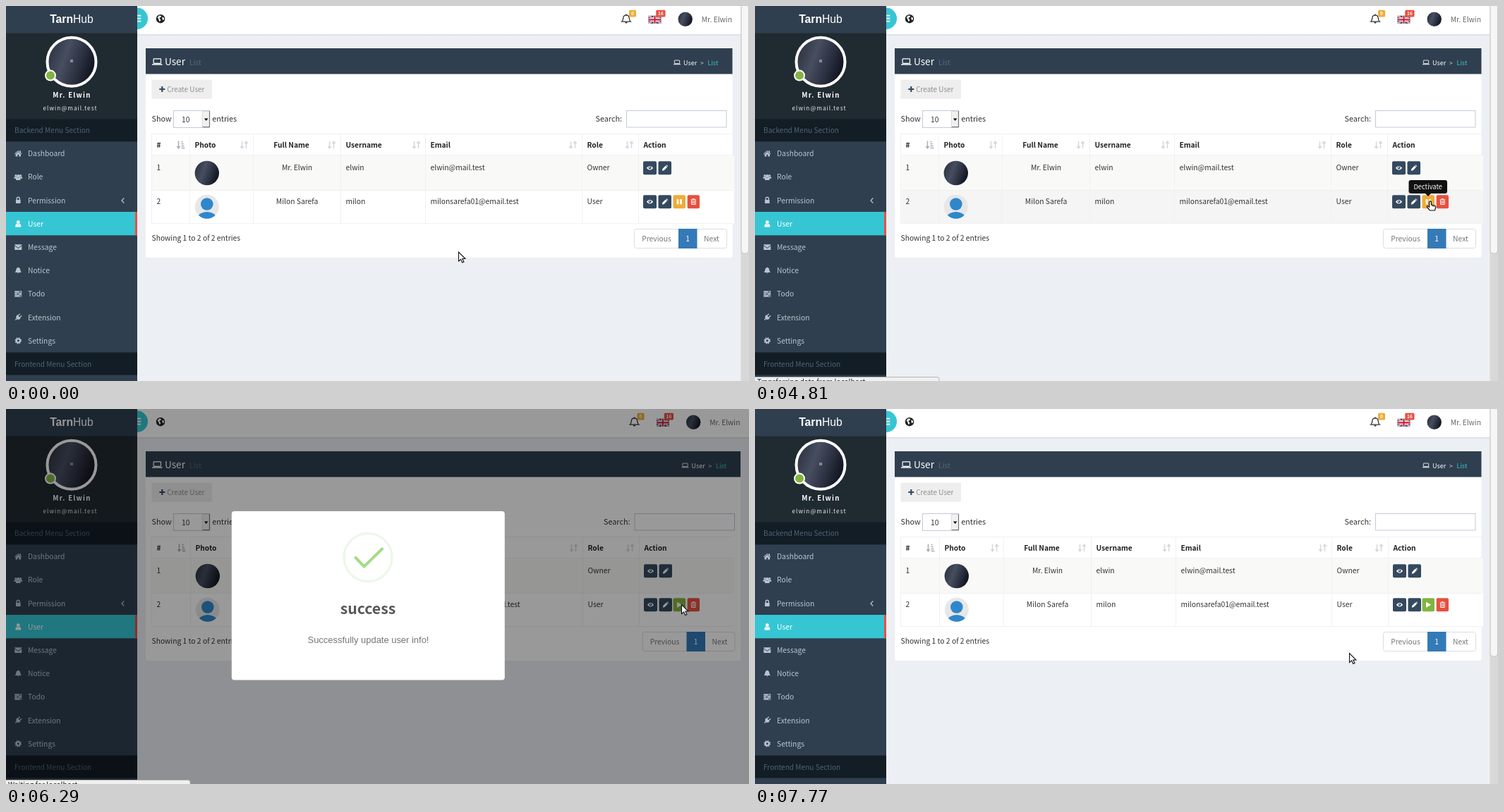
Animation of 1053 by 532 pixels, one loop 8 s. Source, as an HTML page:

```html
<!DOCTYPE html>
<html lang="en">
<head>
<meta charset="utf-8">
<title>User list</title>
<style>
html, body { margin: 0; width: 100%; height: 100%; overflow: hidden; background: #fff; }
svg { display: block; width: 1053px; height: 532px; }
text { font-family: "Noto Sans CJK JP", "Noto Sans CJK SC", "Noto Sans CJK", "Noto Sans", sans-serif; white-space: pre; }
.arial { font-family: "Liberation Sans", Arial, sans-serif; }
</style>
</head>
<body>
<svg viewBox="0 0 1053 532">
  <defs>
    <linearGradient id="photo" x2="1" y2=".35">
      <stop offset="0" stop-color="#252b37"/><stop offset=".45" stop-color="#474e60"/>
      <stop offset=".75" stop-color="#2d3242"/><stop offset="1" stop-color="#151824"/>
    </linearGradient>
    <linearGradient id="shade" x2="0" y2="1">
      <stop offset="0" stop-color="#d9dde2"/><stop offset="1" stop-color="#eceff4"/>
    </linearGradient>
    <clipPath id="round"><circle r="17"/></clipPath>
  </defs>
  <g id="stage"></g>
</svg>
<script>
const NAVY = '#2f3f4f', CYAN = '#36c6d3', RED = '#e7503f', ORANGE = '#f0ac38', GREEN = '#82b440';
const INK = '#333', FADED = '#c6c9cd';
const OWNER = 'Mr. Elwin', OWNER_MAIL = 'elwin@mail.test';

const rect = (x, y, w, h, fill, extra = '') =>
  `<rect x="${x}" y="${y}" width="${w}" height="${h}" fill="${fill}" ${extra}/>`;
const circle = (x, y, r, fill, extra = '') => `<circle cx="${x}" cy="${y}" r="${r}" fill="${fill}" ${extra}/>`;
const path = (d, fill, extra = '') => `<path d="${d}" fill="${fill}" ${extra}/>`;
const line = (d, color, width = 1, extra = '') =>
  path(d, 'none', `stroke="${color}" stroke-width="${width}" ${extra}`);
const text = (x, y, s, fill = INK, size = 10.3, extra = '') =>
  `<text x="${x}" y="${y}" fill="${fill}" font-size="${size}" ${extra}>${s}</text>`;
const at = (x, y, content, scale = 1) => `<g transform="translate(${x} ${y}) scale(${scale})">${content}</g>`;
const MID = 'text-anchor="middle"', END = 'text-anchor="end"', BOLD = 'font-weight="700"';

// Icons are centred on the origin and about 11 px wide.
const person = c => circle(0, -2.3, 2.6, c) + path('M-4.2 5V3Q-4 .2-2 .2Q0 1.6 2 .2Q4 .2 4.2 3V5z', c);
const icons = {
  home: c => path('M-5.6 .3L0-4.6 2.4-2.5V-4.2H4V-1.1L5.6 .3 5 1 0-3.3-5 1zM-4 1L0-2.4 4 1V4.6H1.1V1.6H-1.1V4.6H-4z', c),
  users: c => at(-3.6, -.6, person(c), .65) + at(3.6, -.6, person(c), .65) + at(0, .6, person(c), .85),
  lock: c => rect(-3.6, -.6, 7.2, 5.2, c, 'rx=".6"') + line('M-2.2-.6V-2.4A2.2 2.2 0 0 1 2.2-2.4V-.6', c, 1.5),
  user: person,
  envelope: c => path('M-5.4-4H5.4V-3L0 1-5.4-3zM-5.4-1.8L0 2.2 5.4-1.8V4.2H-5.4z', c),
  bell: c => path('M-5 3Q-3.2 1.4-3.2-1.4Q-3-4-.6-4.5Q0-5.4 .6-4.5Q3-4 3.2-1.4Q3.2 1.4 5 3zM-1.3 3.5H1.3Q0 5.6-1.3 3.5', c),
  tasks: c => [-4.4, -1.2, 2].map((y, i) => rect(-5.4, y, 10.8, 2.5, c) + rect([1, -2, 2][i], y + .8, 3, .9, NAVY)).join(''),
  plug: c => at(0, 0, `<g transform="rotate(45)">${path('M-3.6-1.6H3.6V0Q3 3 .7 3.3V6H-.7V3.3Q-3 3-3.6 0z', c)}${
    rect(-2.6, -5.4, 1.4, 4, c)}${rect(1.2, -5.4, 1.4, 4, c)}</g>`),
  cog: c => circle(0, 0, 2.8, 'none', `stroke="${c}" stroke-width="2.3"`) +
    circle(0, 0, 4.4, 'none', `stroke="${c}" stroke-width="1.5" stroke-dasharray="1.73 1.73"`),
  laptop: c => rect(-5.2, -4.2, 10.4, 6.6, 'none', `rx=".8" stroke="${c}" stroke-width="1.2"`) + rect(-7.3, 3.2, 14.6, 1.6, c, 'rx=".6"'),
  plus: c => line('M-4.2 0H4.2M0-4.2V4.2', c, 2.3),
  eye: c => path('M-5.2 0Q0-6.4 5.2 0Q0 6.4-5.2 0', c) + circle(0, -.2, 2.3, '#34495e') + circle(-.5, -.7, .9, c),
  pencil: c => path('M-4.4 4.4L-3.7 1.3 1.2-3.6 3.6-1.2-1.3 3.7zM1.9-4.2L2.8-5 5-2.8 4.2-1.9z', c),
  pause: c => rect(-4, -4, 3, 8, c) + rect(1, -4, 3, 8, c),
  play: c => path('M-3.6-4.4L4.4 0-3.6 4.4z', c),
  trash: c => line('M-4.2-3.1H4.2M-1.4-3.3V-4.5H1.4V-3.3', c, 1.1) +
    line('M-3.1-2.5V4.2H3.1V-2.5M-1.1-1.4V2.8M1.1-1.4V2.8', c, 1.1),
  globe: c => circle(0, 0, 6.2, c) + path('M-2-4.8L1.2-4.2 .2-2.2-1.8-1.2-.6 .4 .4 2-1.4 4-3-.2-4.4-1.6zM2.4-2.6L5-1.4 4.6 1.8 2.6 1z', '#fff'),
  sort: c => line('M-3-5V4.5M3 5V-4.5', c, 1.5) + path('M-6 2H0L-3 6zM0-2H6L3-6z', c),
  amount: c => line('M-3-5.5V4', c, 1.5) + path('M-6 2H0L-3 6z', c) + line('M1-4.6H3M1-1.6H4M1 1.4H5M1 4.4H6', c, 1.5)
};
const icon = (name, x, y, color, scale = 1) => at(x, y, icons[name](color), scale);

const photo = (x, y, r, extra = '') => circle(x, y, r, 'url(#photo)', extra);

function sidebar() {
  const menu = ['home Dashboard', 'users Role', 'lock Permission', 'user User', 'envelope Message',
    'bell Notice', 'tasks Todo', 'plug Extension', 'cog Settings'];
  const items = menu.map((entry, i) => {
    const [glyph, label] = entry.split(' '), y = 209.2 + i * 33.2, active = label === 'User';
    const color = active ? '#fff' : '#b9c4cf';
    return (active ? rect(0, 292, 186, 33.3, CYAN) + rect(183, 292, 3, 33.3, RED) : '') +
      icon(glyph, 17.3, y, color, .93) + text(31, y + 3.9, label, color);
  }).join('');
  const section = (y, label) => rect(0, y, 186, 32, '#131d25') + text(12, y + 20, label, '#4c6478', 10.1);
  return rect(0, 0, 186, 532, NAVY) + rect(0, 38.5, 186, 122, '#202a31') +
    `<text class="arial" x="93" y="24" font-size="15.7" fill="#fff" text-anchor="middle"><tspan font-weight="700">Tarn</tspan>Hub</text>` +
    photo(93, 79.3, 34.5, 'stroke="#fff" stroke-width="4"') + rect(91, 76, 4, 4, '#858b96') +
    circle(63, 98.6, 8, '#fff') + circle(63, 98.6, 6, GREEN) +
    text(93.5, 129.5, OWNER, '#fff', 9.6, `${MID} ${BOLD} letter-spacing="1.25"`) +
    text(91, 148.2, OWNER_MAIL, '#e6e9ec', 8.3, `${MID} letter-spacing="1"`) +
    section(160.3, 'Backend Menu Section') + items +
    line('M167.3 272.5L164 276 167.3 279.5', '#b9c4cf', 1.2) + section(491.5, 'Frontend Menu Section');
}

function topbar(dx) {
  const badge = (x, w, fill, s) => rect(x, 5.8, w, 9.6, fill, 'rx="1.5"') + text(x + w / 2, 13, s, '#fff', 6.5, `${MID} ${BOLD}`);
  const flag = rect(-9, -5.5, 18, 11, '#26346f') + line('M-9-5.5L9 5.5M-9 5.5L9-5.5', '#fff', 2.2) +
    line('M-9-5.5L9 5.5M-9 5.5L9-5.5', '#c8303c', .8) + line('M-9 0H9M0-5.5V5.5', '#fff', 4) + line('M-9 0H9M0-5.5V5.5', '#cf2333', 2.2);
  const bell = line('M-6.3 3.6Q-4.2 1.6-4.2-1.8Q-3.8-5.4 0-5.6Q3.8-5.4 4.2-1.8Q4.2 1.6 6.3 3.6z', '#333', 1.3) + path('M-2 4.6H2Q0 8 -2 4.6M-.7-7H.7V-5H-.7z', '#333');
  return rect(186, 0, 867, 40, '#fff') + rect(186, 40, 867, 3, 'url(#shade)') +
    circle(185.8, 17.7, 15.2, CYAN) + line('M180.3 13.7H191.3M180.3 17.7H191.3M180.3 21.7H191.3', '#fff', 1.7) +
    icon('globe', 219, 18.2, '#222') +
    at(dx, 0, at(879, 18.5, bell) + badge(883, 10, ORANGE, '0') + at(919.5, 19.3, flag) + badge(921.3, 13.2, RED, '16') +
      photo(962.7, 18.7, 10.2) + text(1029, 22.5, OWNER, '#666', 10.3, END));
}

function table(updated, hover) {
  const cols = updated ? [206.5, 261.5, 352.5, 476.5, 596.5, 817.5, 897.5] : [206.5, 260.5, 350.5, 474.5, 594.5, 816.5, 896.5];
  const heads = ['#', 'Photo', 'Full Name', 'Username', 'Email', 'Role', 'Action'];
  const nameX = (cols[2] + cols[3]) / 2;
  const head = heads.map((label, i) => {
    const centred = i === 2;
    return text(centred ? nameX - 8 : cols[i] + 7, 201, label, '#222', 10.2, `${BOLD} ${centred ? MID : ''}`) +
      (i < 6 ? icon(i ? 'sort' : 'amount', cols[i + 1] - 13, 197, i ? '#d5d7da' : '#a9adb2') : '');
  }).join('');
  const row = (y, cells) => cells.map((s, i) => s && text(i === 2 ? nameX : cols[i] + 7, y, s, INK, 10.3, i === 2 ? MID : '')).join('');
  const button = (x, y, w, fill, glyph) => rect(x, y, w, 19, fill, 'rx="2"') + icon(glyph, x + w / 2, y + 9.5, '#fff', .9);
  const x = cols[6] + 6.5;
  const common = y => button(x, y, 19, '#34495e', 'eye') + button(x + 21.5, y, 18.5, '#34495e', 'pencil');
  const silhouette = circle(0, 0, 17, '#e7e7e7') +
    `<g clip-path="url(#round)"><ellipse cy="16" rx="13" ry="8.6" fill="#2f87cb"/></g>` +
    circle(0, -3.5, 10.4, '#e7e7e7') + circle(0, -3.7, 8.8, '#2f87cb');
  return rect(207, 212, 825, 49, '#f9f9f7') + rect(207, 261, 825, 48, hover ? '#f5f5f5' : '#fff') +
    line(`M206.5 181.5H1030M206.5 211.5H1030M206.5 261.5H1030M206.5 308.5H1030${cols.map(c => `M${c} 181.5V308.5`).join('')}`, '#f0f1f2') +
    head + row(232.5, ['1', '', OWNER, 'elwin', OWNER_MAIL, 'Owner']) +
    row(280.5, ['2', '', 'Milon Sarefa', 'milon', 'milonsarefa01@email.test', 'User']) +
    photo(cols[1] + 24.3, 237, 17.2) + at(cols[1] + 24.3, 284.7, silhouette) +
    common(220.3) + common(268.2) +
    button(945.5, 268.2, 17.5, updated ? GREEN : ORANGE, updated ? 'play' : 'pause') + button(965.7, 268.2, 17.3, RED, 'trash');
}

function page({ updated, hover, wide }) {
  const dx = wide ? 11.5 : 0;
  const scrollbar = rect(1041.5, 0, 12, 532, '#d8d8d8') + rect(1042, -6, 10.5, 357, '#f6f6f6', 'rx="4" stroke="#c4c4c4"');
  const crumbs = icon('laptop', 951, 80, '#fff', .7) + text(960, 83.6, 'User', '#fff', 9) +
    text(984, 83.6, '&gt;', '#cfd6dc', 8.6) + text(994.5, 83.6, 'List', CYAN, 9);
  const pager = rect(890.5, 316.5, 131, 27, '#fff', 'rx="3" stroke="#ddd"') + rect(953, 316, 26.5, 28, '#337ab7') +
    text(922, 333.7, 'Previous', '#777', 10.3, MID) + text(966, 333.7, '1', '#fff', 10.3, MID) + text(1000, 333.7, 'Next', '#777', 10.3, MID);
  const select = rect(237.5, 148.5, 51, 24, '#fff', 'stroke="#c2cad8"') + text(249, 165, '10') +
    rect(278, 149.5, 10, 22, '#f1f1f1') + line('M278.5 171.5H288.5V149', '#777', 1.2) + line('M278.3 171V149.5H288', '#ddd') +
    path('M281 159.5H286.4L283.7 163z', '#000');
  return rect(0, 0, 1053, 532, '#eceff4') + topbar(dx) + sidebar() +
    rect(198, 60, 831.5 + dx, 297, '#fff', 'rx="2"') + rect(198, 60, 831.5 + dx, 36.5, NAVY) +
    icon('laptop', 214.3, 79, '#fff') + text(225, 84.2, 'User', '#fff', 13.6) + text(260, 84, 'List', '#53687a', 10.2) +
    rect(206.5, 104.7, 85.5, 27, '#eee') + icon('plus', 221.3, 118, '#34495e', .95) + text(228.3, 122, 'Create User', '#8f8f8f', 9.9) +
    text(206.5, 163.7, 'Show', INK, 10.8) + select + text(292.3, 163.7, 'entries', INK, 10.8) +
    at(dx, 0, crumbs + text(873, 163.7, 'Search:', INK, 10.8, END) + rect(879.5, 148.5, 141.5, 23.5, '#fff', 'stroke="#c2cad8"') + pager) +
    table(updated, hover) + text(206.5, 333, 'Showing 1 to 2 of 2 entries') + (wide ? '' : scrollbar);
}

const tooltip = () => rect(926.5, 247, 54.5, 19, '#111', 'rx="3"') + path('M950 266H958L954 270z', '#111') +
  text(953.7, 260.2, 'Dectivate', '#fff', 9.3, MID);

const statusBar = (label, width) => rect(-4, 526.5, width + 4, 12, '#f0f0f0', 'rx="3" stroke="#b5b5b5"') + text(3, 537, label, '#222');

function modal({ check, scale = 1, boxed = true }) {
  return `<g transform="translate(513 264.8) scale(${scale}) translate(-513 -264.8)">` +
    (boxed ? rect(319.8, 145, 387, 239.5, '#fff', 'rx="4"') : '') +
    circle(513, 210.5, 34, 'none', 'stroke="#edf7e7" stroke-width="3.2"') +
    (check ? line(check, '#a5dc86', 4, 'stroke-linecap="round"') : '') +
    text(513, 291, 'success', '#575757', 21.2, `${MID} ${BOLD}`) +
    text(513.5, 332, 'Successfully update user info!', '#767676', 12.95, `${MID} class="arial"`) + '</g>';
}

const arrow = path('M.5 .5V13.5L3.6 10.8 5.7 15.4 7.9 14.4 5.8 10H9.9z', '#fff', 'stroke="#111" stroke-width="1.1"');
const hand = path('M-1.4 1Q0-1.4 1.4 1V5L6.4 6.2Q8 6.8 7.6 9L6.6 13H-.6L-4.8 8Q-4.6 6-2.8 7L-1.4 8.2z', '#fff', 'stroke="#111" stroke-width="1.2"') +
  line('M3.2 5.6V7.4M5.2 6.2V8', '#111', .9);

const DRAWING = 'M482.5 198.5L508 222.5 527.5 204.5', DRAWN = 'M495.5 211L507.5 223.5 533 198.5';
const WAIT = ['Waiting for localhost...', 261], TRANSFER = ['Transferring data from localhost...', 261];
const click = { cursor: [957, 277], hand: true, hover: true };
const loading = { cursor: [957, 277], blank: true };
const done = { updated: true, wide: true, dim: true, modal: { check: DRAWN } };

const steps = [
  [0, { cursor: [641, 348.5] }],
  [740, { cursor: [656, 348.5] }],
  [1480, { cursor: [706, 333] }],
  [1850, { cursor: [815, 339] }],
  [2220, { cursor: [928, 323] }],
  [2590, click],
  [2960, { ...click, tip: true, status: ['localhost/tarnhub/panel/user/status/175/0', 249] }],
  [3330, { ...click, tip: true, status: ['Connecting to localhost...', 249] }],
  [4070, { ...click, tip: true, status: WAIT }],
  [4810, { ...click, tip: true, status: TRANSFER }],
  [5180, { ...loading, status: WAIT }],
  [5550, { ...loading, status: WAIT, modal: { scale: .783, boxed: false } }],
  [5920, { ...loading, status: TRANSFER, dim: true, modal: { check: DRAWING } }],
  [6290, { ...done, cursor: [957, 277], status: WAIT }],
  [6660, { ...done, cursor: [957, 277] }],
  [7030, { ...done, cursor: [935, 302] }],
  [7400, { updated: true, cursor: [781, 356] }],
  [7770, { updated: true, cursor: [842, 346] }]
];

const draw = s => (s.blank ? rect(0, 0, 1053, 532, '#fefefe') : page(s)) +
  (s.dim ? rect(0, 0, 1053, 532, '#000', 'opacity=".4"') : '') +
  (s.modal ? modal(s.modal) : '') + (s.tip ? tooltip() : '') +
  (s.status ? statusBar(...s.status) : '') + at(...s.cursor, s.hand ? hand : arrow);

const stage = document.getElementById('stage');
const start = performance.now();
let shown = null;
function tick() {
  const time = (performance.now() - start) % 8000;
  const current = steps.findLast(([from]) => from <= time)[1];
  if (current !== shown) {
    stage.innerHTML = draw(current);
    shown = current;
  }
  requestAnimationFrame(tick);
}
tick();
</script>
</body>
</html>
```
